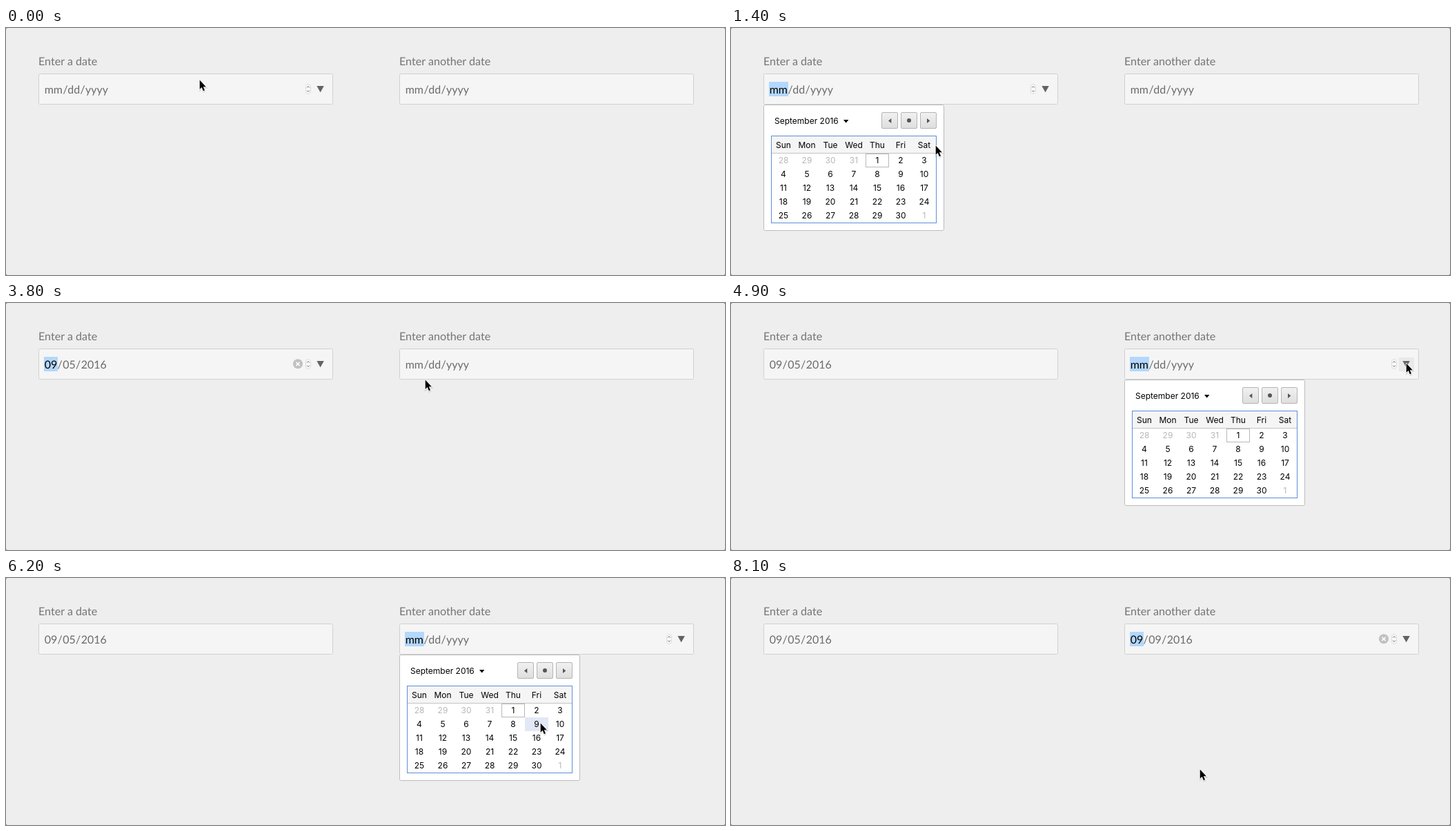
Write an HTML page that moves like this. It is 1042 px wide and 358 px high and loops after 8.2 s.

```html
<!DOCTYPE html>
<html lang="en">
<head>
<meta charset="utf-8">
<title>Date inputs</title>
<style>
html, body { margin: 0; width: 100%; height: 100%; overflow: hidden; background: #eee; }
svg { display: block; width: 100%; height: 100%; }
.label, .value { font: 16px Lato, sans-serif; fill: #757575; text-rendering: geometricPrecision; }
.label { font-size: 16.15px; }
.value { fill: #6b6b6b; }
.cal { font: 12px Inter, sans-serif; }
.mid { text-anchor: middle; }
</style>
</head>
<body>
<svg viewBox="0 0 1042 358" xmlns="http://www.w3.org/2000/svg">
  <defs>
    <linearGradient id="btn" x1="0" y1="0" x2="0" y2="1">
      <stop offset="0" stop-color="#f1f1f1"/>
      <stop offset="1" stop-color="#dedede"/>
    </linearGradient>
    <path id="arrow" d="M0 0V13.2L3 10.4 5.2 15.6 7.3 14.7 5.1 9.6H9.2Z"/>
  </defs>
  <rect width="1042" height="358" fill="#777"/>
  <rect width="1042" height="358" rx="2.5" fill="#eee"/>
  <g id="scene"></g>
  <g id="cursor">
    <use href="#arrow" x=".3" y="1.3" stroke="#000" stroke-width="2" opacity=".12"/>
    <use href="#arrow" stroke="#fff" stroke-width="1.6" stroke-linejoin="round"/>
    <use href="#arrow"/>
  </g>
</svg>
<script>
const LOOP = 8200, STEP = 100, OFFSET = 523;
const scene = document.getElementById('scene');
const cursor = document.getElementById('cursor');

// Pointer waypoints: time, x, y
const PATH = [
  [0, 281, 75], [300, 385, 62], [600, 466, 78], [900, 455, 86], [1000, 454, 86],
  [1400, 297, 170], [1800, 243, 198], [2600, 93, 211], [2800, 101, 211],
  [3400, 104, 213], [3600, 118, 221], [3800, 608, 111], [4200, 840, 88],
  [4500, 992, 85], [4800, 979, 87], [5400, 979, 87], [6200, 775, 210],
  [6300, 764, 203], [6700, 762, 203], [7500, 753, 204], [7700, 752, 205], [8100, 680, 277]
];

// Each field opens its calendar on focus and gets its value on pick
const FIELDS = [
  { label: 'Enter a date', open: 800, pick: 3100, blur: 4900, date: ['09', '05', '2016'] },
  { label: 'Enter another date', open: 4900, pick: 7000, blur: LOOP, date: ['09', '09', '2016'] }
];
const DAYS = ['Sun', 'Mon', 'Tue', 'Wed', 'Thu', 'Fri', 'Sat'];

const rect = (x, y, w, h, fill, rest = '') =>
  `<rect x="${x}" y="${y}" width="${w}" height="${h}" fill="${fill}" ${rest}/>`;
const path = (d, fill, rest = '') => `<path d="${d}" fill="${fill}" ${rest}/>`;
const text = (x, y, s, rest = '') => `<text x="${x}" y="${y}" ${rest}>${s}</text>`;

const slope = (i, k) => (PATH[i + 1][k] - PATH[i][k]) / (PATH[i + 1][0] - PATH[i][0]);

function tangent(i, k) {
  if (i === 0 || i === PATH.length - 1) return 0;
  const a = slope(i - 1, k), b = slope(i, k);
  return a * b > 0 ? 2 * a * b / (a + b) : 0;
}

// Monotone cubic interpolation between waypoints
function pointer(t) {
  let i = 0;
  while (i < PATH.length - 2 && t >= PATH[i + 1][0]) i++;
  const span = PATH[i + 1][0] - PATH[i][0];
  const u = Math.min(1, (t - PATH[i][0]) / span), v = 1 - u;
  return [1, 2].map(k =>
    v * v * (1 + 2 * u) * PATH[i][k] + u * u * (3 - 2 * u) * PATH[i + 1][k] +
    span * u * v * (v * tangent(i, k) - u * tangent(i + 1, k)));
}

const inside = (x, y, x0, y0, x1, y1) => x >= x0 && x < x1 && y >= y0 && y < y1;

function controls(x, y, filled) {
  let s = inside(x, y, 446, 78, 467, 99) ? rect(445, 79, 22, 20, '#e9e9e9') : '';
  if (filled) {
    s += '<circle cx="423" cy="88.3" r="7" fill="#c1c1c1"/>' +
      path('M420.4 85.7l5.2 5.2m0-5.2l-5.2 5.2', 'none', 'stroke="#fff" stroke-width="1.6"');
  }
  return s + rect(434.5, 81.5, 7, 14, '#fafafa', 'rx="3.5" stroke="#dcdcdc"') +
    path('M436.2 86.6l1.8-2.2 1.8 2.2M436.2 90.4l1.8 2.2 1.8-2.2', 'none', 'stroke="#777"') +
    path('M450.4 84h10.4l-5.2 9.2Z', '#626367');
}

function calendar(x, y) {
  let s = rect(47.5, 111.5, 261, 182, '#fff', 'rx="2" stroke="#bcbcbc"') +
    text(63, 139, 'September 2016') + path('M163 133h7.4l-3.7 4.4Z', '#000');
  for (const bx of [218, 246, 274]) {
    s += rect(bx + .5, 122.5, 23, 23, 'url(#btn)', 'rx="1.5" stroke="#b4b4b4"');
  }
  s += path('M232.3 131v7l-4.3-3.5Z', '#555') + '<circle cx="258" cy="134" r="3" fill="#555"/>' +
    path('M284 131v7l4.3-3.5Z', '#555') +
    rect(58.5, 156.5, 239, 126, '#fff', 'stroke="#5e8fd8"') +
    rect(59, 157, 238, 24, '#f5f5f5') + rect(59, 181, 238, 1, '#c4c4c4');
  if (inside(x, y, 59, 182, 297, 282)) {
    const col = Math.floor((x - 59.5) / 34), row = Math.floor((y - 182) / 20);
    s += rect(59 + col * 34, 182 + row * 20, 34, 20, '#e2e8f5');
  }
  s += rect(195.5, 182.5, 33, 19, 'none', 'stroke="#b8b8b8"');
  DAYS.forEach((d, i) => { s += text(76 + 34 * i, 174, d, 'class="mid"'); });
  for (let i = 0; i < 35; i++) {
    const n = i < 4 ? 28 + i : i === 34 ? 1 : i - 3;
    const fill = i < 4 || i === 34 ? '#b7b7b7' : '#000';
    s += text(76 + 34 * (i % 7), 196 + 20 * Math.floor(i / 7), n, `class="mid" fill="${fill}"`);
  }
  return `<g class="cal">${s}</g>`;
}

function field(f, t, x, y) {
  const focused = t >= f.open && t < f.blur, filled = t >= f.pick;
  const [m, d, yr] = filled ? f.date : ['mm', 'dd', 'yyyy'];
  let s = text(47, 53.8, f.label, 'class="label"') +
    rect(47.5, 66.5, 426, 44, '#f5f5f5', 'rx="2" stroke="#d0d0d0"');
  if (focused) s += rect(55, 78, filled ? 20 : 28, 21, '#b3d7fd');
  const part = p => `<tspan dx=".35">${p}</tspan>`;
  s += text(55.7, 95, `<tspan${focused ? ' fill="#000"' : ''}>${m}</tspan>` +
    ['/', d, '/', yr].map(part).join(''), 'class="value"');
  if (focused || inside(x, y, 47, 66, 474, 111)) s += controls(x, y, filled);
  if (focused && !filled) s += calendar(x, y);
  return s;
}

function draw(time) {
  const t = Math.floor((time % LOOP) / STEP) * STEP;
  const [x, y] = pointer(t);
  scene.innerHTML = FIELDS.map((f, i) =>
    `<g transform="translate(${i * OFFSET})">${field(f, t, x - i * OFFSET, y)}</g>`).join('');
  cursor.setAttribute('transform', `translate(${x - .3} ${y + .6})`);
}

const start = performance.now();
function tick() {
  draw(performance.now() - start);
  requestAnimationFrame(tick);
}
tick();
</script>
</body>
</html>
```
